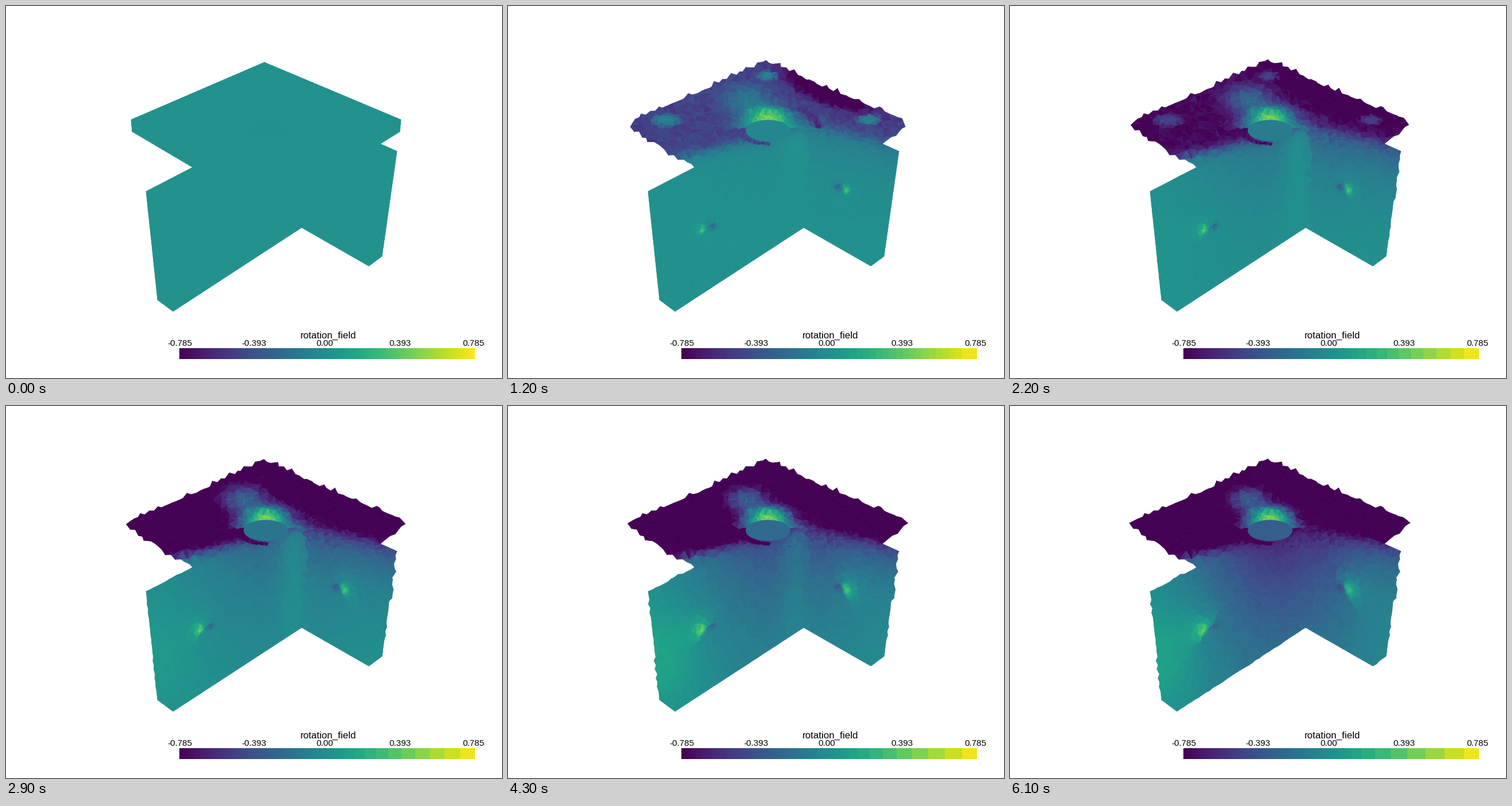
A matplotlib script that plays this animation: 864x648 px, repeating every 6.2 s.

```python
import numpy as np
import matplotlib.pyplot as plt
from matplotlib.animation import FuncAnimation
from matplotlib.collections import PolyCollection
from matplotlib.patches import Ellipse
from matplotlib.path import Path
from matplotlib.tri import Triangulation

W, H, DPI = 864, 648, 100
FRAMES, STEP = 62, 100
LIMIT = 0.785
rng = np.random.default_rng(4)
cmap = plt.get_cmap("viridis")

# Silhouette corners, clockwise from the back of the plate
REST = np.array([
    (450, 98), (688, 198), (686, 219), (652, 240), (681, 253), (655, 436),
    (632, 453), (515, 386), (291, 532), (264, 512), (244, 323), (325, 281),
    (220, 219), (218, 198)], float)
# How far the plate's corners travel
SHIFT = {0: (-1, -6), 1: (-3, -4), 2: (11, -16), 12: (-12, -15), 13: (6, -2)}
# edges, spike height, start and end of growth in seconds
JAGS = [((0, 2, 11, 13), 5.5, 0, 0.7), ((4,), 6, 1.2, 2.9),
        ((9, 10), 2.5, 2, 4.3), ((5, 7), 1, 4, 6)]
# edge: how far its middle bows outwards
BOWS = {0: -2.5, 11: 4, 13: -2.5}

BOLTS = [(452, 121, 17, 9), (628, 198, 20, 10), (275, 199, 24, 11)]
BORE = (453, 217, 39, 18.5)
BOSS = (453, 212, 88, 40)
# green centre, blue centre, direction of the side that stays dark
SPOTS = [((339, 391), (356, 383), (0.83, 0.56)),
         ((588, 321), (574, 315), (-0.9, 0.44))]


def grow(t, start, end):
    return np.clip((t - start) / (end - start), 0, 1)


def bell(d):
    return np.exp(-d ** 2)


def radius(x, y, shape):
    x0, y0, rx, ry = shape
    return np.hypot((x - x0) / rx, (y - y0) / ry)


def oval(shape, scale, n):
    x0, y0, rx, ry = shape
    a = np.linspace(0, 2 * np.pi, n, endpoint=False)
    return np.column_stack([x0 + rx * scale * np.cos(a),
                            y0 + ry * scale * np.sin(a)])


def sample_rim(spacing=7.5):
    """Edge number and position along the edge for every rim point."""
    edge, u = [], []
    for i, d in enumerate(np.roll(REST, -1, axis=0) - REST):
        n = max(1, round(np.hypot(*d) / spacing))
        edge += [i] * n
        u += list(np.arange(n) / n)
    return np.array(edge), np.array(u)


rim_edge, rim_u = sample_rim()
is_tooth = rng.random(len(rim_u)) < 0.38
spike = np.where(is_tooth, rng.uniform(0.3, 1, len(rim_u)),
                 rng.uniform(-0.5, 0, len(rim_u))) * (rim_u > 0)
slide = rng.uniform(-0.5, 0.5, len(rim_u)) * (rim_u > 0)


def rim(t):
    s = 1 - np.exp(-t / 1.5)
    corners = REST.copy()
    for i, d in SHIFT.items():
        corners[i] += np.array(d) * s
    a = corners[rim_edge]
    d = np.roll(corners, -1, axis=0)[rim_edge] - a
    along = d / np.hypot(d[:, 0], d[:, 1])[:, None]
    normal = np.column_stack([along[:, 1], -along[:, 0]])

    height = np.zeros(len(rim_u))
    for edges, h, start, end in JAGS:
        height[np.isin(rim_edge, edges)] = h * grow(t, start, end)
    height[rim_edge == 4] *= 1 - rim_u[rim_edge == 4]
    bow = np.array([BOWS.get(e, 0) for e in rim_edge]) * np.sin(np.pi * rim_u)
    out = spike * height + bow * s
    return (a + d * rim_u[:, None] + normal * out[:, None]
            + along * (slide * height)[:, None])


def grid(y0, y1, dx, dy):
    y, x = np.mgrid[y0:y1:dy, 205:700:dx]
    x = x + rng.uniform(-0.3, 0.3, x.shape) * dx
    y = y + rng.uniform(-0.3, 0.3, y.shape) * dy
    return np.column_stack([x.ravel(), y.ravel()])


def build_mesh():
    edge = rim(0)
    parts = [grid(95, 250, 14, 7), grid(250, 535, 14, 13)]
    parts += [oval(BORE, s, 34) for s in (1.0, 1.18, 1.4)]
    parts += [oval(BOSS, s, 50) for s in (0.94, 1.06)]
    for x0, y0, rx, ry in BOLTS:
        parts.append(rng.normal((x0, y0), (rx * 0.7, ry * 0.7), (25, 2)))
    for green, blue, _ in SPOTS:
        parts.append(rng.normal(green, 8, (35, 2)))
        parts.append(rng.normal(blue, 5, (14, 2)))
    inner = np.vstack(parts)
    outline = Path(REST)
    gap = np.hypot(*(inner[:, None] - edge[None]).transpose(2, 0, 1)).min(axis=1)
    inner = inner[outline.contains_points(inner) & (gap > 5.5)]
    pts = np.vstack([edge, inner])
    tris = Triangulation(pts[:, 0], pts[:, 1]).triangles
    return inner, tris[outline.contains_points(pts[tris].mean(axis=1))]


inner, tris = build_mesh()
cx, cy = np.vstack([rim(0), inner])[tris].mean(axis=1).T
grain = rng.normal(0, 1, len(cx)) * np.where(cy < 245, 0.035, 0.012)

# The plate meets the walls along a shallow V
depth = cy - (204 + 0.26 * np.abs(cx - 528))
on_plate = 1 / (1 + np.exp(np.clip(depth / 6, -30, 30)))
below = np.maximum(depth, 0)

across, down = cx - 555, cy - 148
back_edge = bell((0.92 * across + 0.39 * down) / 65) \
    * bell((0.92 * down - 0.39 * across) / 18)
pattern = (1 + 1.6 * back_edge) * (1 - 0.68 * bell(radius(cx, cy, (415, 161, 42, 24))))

bore_r = radius(cx, cy, BORE)
boss_r = radius(cx, cy, BOSS)
crescent = (np.exp(-np.abs((bore_r - 1) / 1.35) ** 3)
            * bell((cx - 453) / 46) * (cy < 213))
ridge = bell((boss_r - 0.98) / 0.1) * np.clip((cx - 450) / 25, 0, 1) * (cy < 211)
groove = (bell((bore_r - 1.22) / 0.16)
          * np.clip((cx - 400) / 20, 0, 1) * (cx < 456) * (cy > 222))


def blend(v, mask, level):
    return v * (1 - mask) + level * mask


def plate_field(t):
    level = -1.06 * (1 - np.exp(-(t / 1.75) ** 1.25))
    v = level * pattern
    for bolt in BOLTS:
        v = v * (1 - (1 - grow(t, 0.7, 3.2)) * np.exp(-radius(cx, cy, bolt) ** 4))
    return v, level


def wall_field(t):
    reach = 40 + 27 * t
    plume = (0.66 * grow(t, 0.9, 6.1) ** 0.8 * np.exp(-below / reach)
             * bell((cx - 480) / 150))
    plume *= 1 - (1 - grow(t, 1.7, 6)) * bell((cx - 500) / 25)
    skirt = 0.45 * grow(t, 0.6, 2.6) * np.exp(-below / 60) * (cx > 521)
    lift = 0.15 * grow(t, 1.9, 4) * bell(radius(cx, cy, (265, 435, 65, 85)))
    return lift - np.hypot(plume, skirt)


def bolt_strain(t):
    """Bright and dark specks beside the two wall bolts."""
    size = 6 + 2.2 * t
    v = 0
    for (gx, gy), (bx, by), (nx, ny) in SPOTS:
        d = np.hypot(cx - gx, cy - gy)
        side = (cx - gx) * nx + (cy - gy) * ny
        lit = 1 / (1 + np.exp(np.clip((side - 3) * 1.2, -30, 30)))
        v = v + lit * (0.22 * bell(d / size) + 0.2 * bell(d / (0.5 * size))
                       + 0.12 * grow(t, 1, 4) * bell(d / (2.2 * size)))
        v = v - (0.3 - 0.025 * t) * bell(np.hypot(cx - bx, cy - by) / 6.7)
    return v * grow(t, 0, 0.7)


def field(t):
    plate, level = plate_field(t)
    v = blend(wall_field(t), on_plate, plate)
    start = grow(t, 0, 0.7)
    v = blend(v, ridge * start * (0.9 - 0.6 * grow(t, 1.2, 3)), -0.65)
    v = blend(v, groove * start * 0.9, level - 0.1)
    v = blend(v, crescent * start, 0.45)
    return v + grain * np.minimum(1, np.abs(v) * 4) + bolt_strain(t)


BAR_L, BAR_R, BAR_T, BAR_B = 302, 817, 596, 615


def bar_colors(t):
    """Colour bar that gets coarser, most of all at its bright end."""
    x = np.arange(BAR_L, BAR_R) + 0.5
    if t > 0:
        coarse = t > 1.35
        n = round(11 - 0.6 * t) if coarse else 17
        bright = 595 + 196 * (np.arange(n + 1) / n) ** (1.25 if coarse else 1)
        edges = np.r_[np.arange(BAR_L, 592, 6), bright, BAR_R]
        mids = (edges[:-1] + edges[1:]) / 2
        x = mids[np.searchsorted(edges, x) - 1]
    return cmap((x - BAR_L) / (BAR_R - BAR_L))[None, :, :3]


fig = plt.figure(figsize=(W / DPI, H / DPI), dpi=DPI, facecolor="white")
ax = fig.add_axes([0, 0, 1, 1])
bar = ax.imshow(bar_colors(0), extent=(BAR_L, BAR_R, BAR_B, BAR_T),
                aspect="auto", interpolation="nearest")
ax.set_xlim(0, W)
ax.set_ylim(H, 0)
ax.axis("off")

mesh = PolyCollection([], cmap=cmap, edgecolors="face", linewidths=0.5)
mesh.set_clim(-LIMIT, LIMIT)
ax.add_collection(mesh, autolim=False)
bore = Ellipse(BORE[:2], 2 * BORE[2], 2 * BORE[3], lw=0, zorder=3)
ax.add_patch(bore)


def label(x, y, text, px):
    ax.text(x, y, text, fontsize=px * 72 / DPI, family="Liberation Sans",
            color="black", ha="center", va="baseline", zorder=4)


label(561.5, 579, "rotation_field", 16.9)
for x, text in [(302.5, "-0.785"), (431.5, "-0.393"), (555.5, "0.00"),
                (686, "0.393"), (814.5, "0.785")]:
    label(x, 591.5, text, 15.3)


def draw(frame):
    t = frame * STEP / 1000
    pts = np.vstack([rim(t), inner])
    mesh.set_verts(pts[tris])
    mesh.set_array(field(t))
    inside = -0.32 * grow(t, 0.9, 6.1) ** 0.6
    bore.set_facecolor(cmap((inside + LIMIT) / (2 * LIMIT)))
    bar.set_data(bar_colors(t))
    return mesh, bore, bar


anim = FuncAnimation(fig, draw, frames=FRAMES, interval=STEP, repeat=True,
                     repeat_delay=0, blit=False)
plt.show()
```
